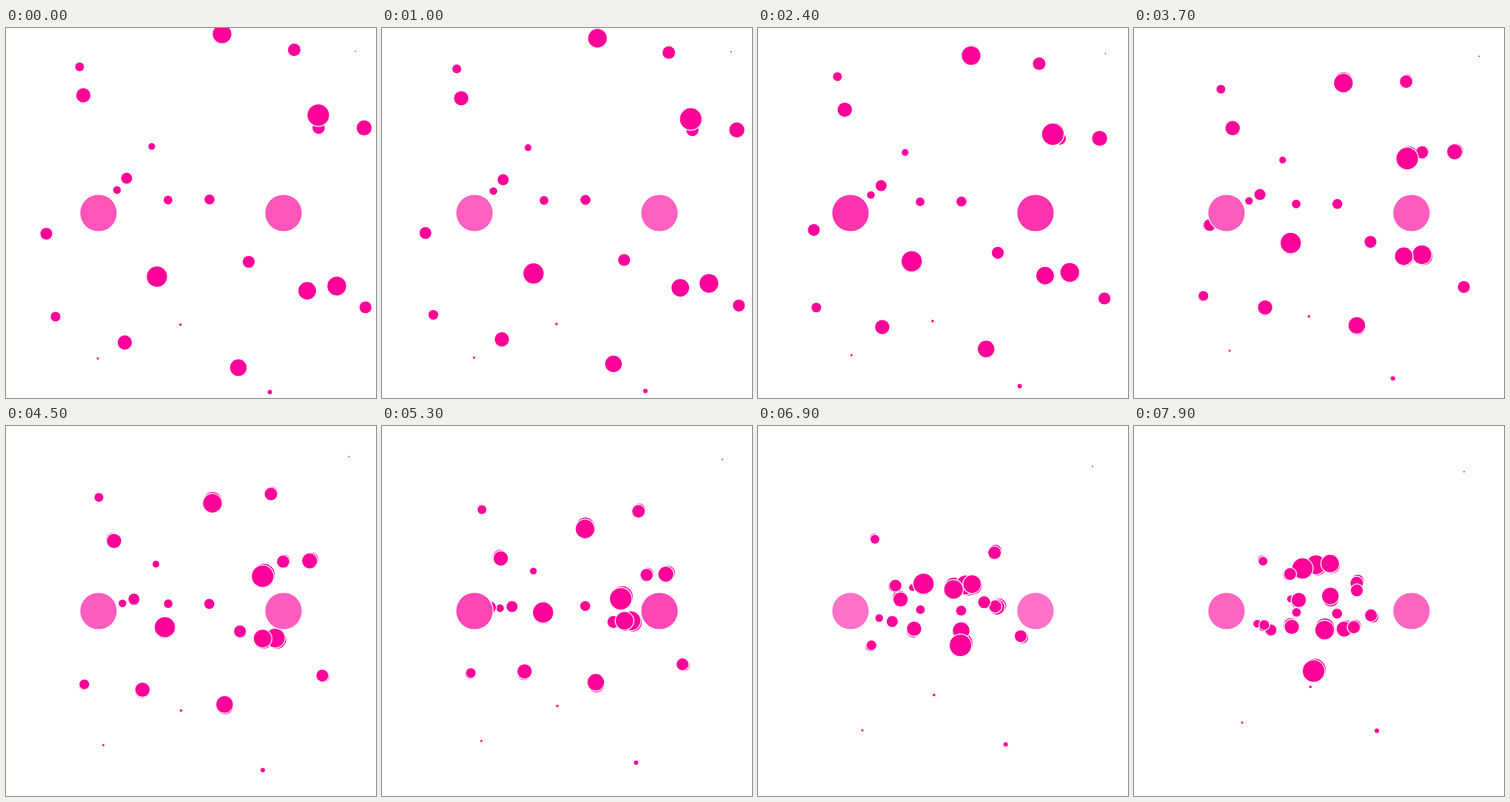
These frames come from a looping animation (500x500 px, 8 s). An HTML page with a canvas:

```html
<!DOCTYPE html>
<html>
<head>
<meta charset="utf-8">
<style>
html, body { margin: 0; width: 100%; height: 100%; overflow: hidden; background: #fff; }
canvas { display: block; }
</style>
</head>
<body>
<canvas id="stage" width="500" height="500"></canvas>
<script>
const ctx = document.getElementById('stage').getContext('2d');
const LOOP = 8000, FRAME = 100;
const STEP = 0.02, HEAD_START = 0.14;
const PULL = 0.3825, NEAR = 5, FAR = 25;
const RIM = 0.8, GAP = 1.3, LAG = 0.06;
const PINK = '#ff0099';
const poles = [[125, 250], [375, 250]];

// Starting point and mass of each dot, in drawing order; all motion follows from these
const starts = [
  [197, 160, 5.4], [219, 232.5, 6.7], [389.5, 29.5, 9.3], [472.3, 31.3, 1.7], [99.5, 52.5, 6.8],
  [104.5, 91, 10.5], [484, 135, 11], [422.5, 135, 9.1], [163, 203, 8.3], [150, 219, 6],
  [275, 231.7, 7.6], [328, 316, 8.9], [447, 348.8, 13.5], [204, 336, 14.5], [54.5, 278, 8.8],
  [407, 355.2, 12.7], [292, 8, 13.4], [67, 390, 7.4], [160.5, 425, 10.5], [314, 459, 12],
  [422, 117.8, 15.4], [485.8, 377.5, 8.9], [235.7, 401, 2.6], [124, 446.5, 2.3], [356.5, 492, 3.8]
];

const wave = (t, period, peak) => Math.cos(2 * Math.PI * (t - peak) / period);

// Pull is constant beyond FAR and grows with the inverse square inside it
function kick(p, dt) {
  for (const [px, py] of poles) {
    const dx = px - p.x, dy = py - p.y, d = Math.hypot(dx, dy) || 1;
    const reach = Math.min(FAR, Math.max(NEAR, d));
    const push = PULL * p.m * (FAR / reach) ** 2 * dt / d;
    p.vx += dx * push;
    p.vy += dy * push;
  }
}

function simulate(t) {
  const steps = Math.round(t / STEP);
  return starts.map(([x, y, m]) => {
    const p = { x, y, m, vx: 0, vy: 0 };
    kick(p, HEAD_START);
    for (let i = 0; i < steps; i++) {
      kick(p, STEP);
      p.x += p.vx * STEP;
      p.y += p.vy * STEP;
    }
    return p;
  });
}

function disc(x, y, r, color) {
  ctx.fillStyle = color;
  ctx.beginPath();
  ctx.arc(x, y, r, 0, 2 * Math.PI);
  ctx.fill();
}

function rimmed(x, y, r, color) {
  disc(x, y, r + GAP, '#fff');
  disc(x, y, r, color);
}

function draw(t) {
  const fade = 0.335 - 0.08 * wave(t, 3.2, 2.4) - 0.05 * wave(t, 10, 2.5);
  const poleColor = `rgb(255,${Math.round(255 * fade)},${Math.round(153 + 102 * fade)})`;
  const dots = simulate(t);
  ctx.fillStyle = '#fff';
  ctx.fillRect(0, 0, 500, 500);
  for (const p of dots) disc(p.x - p.vx * LAG, p.y - p.vy * LAG, p.m - RIM, PINK);
  for (const p of dots) rimmed(p.x, p.y, p.m - RIM, PINK);
  for (const [x, y] of poles) rimmed(x, y, 24.6, poleColor);
}

const begin = performance.now();
function tick() {
  const ms = (performance.now() - begin) % LOOP;
  draw(Math.floor(ms / FRAME) * FRAME / 1000);
  requestAnimationFrame(tick);
}
tick();
</script>
</body>
</html>
```
